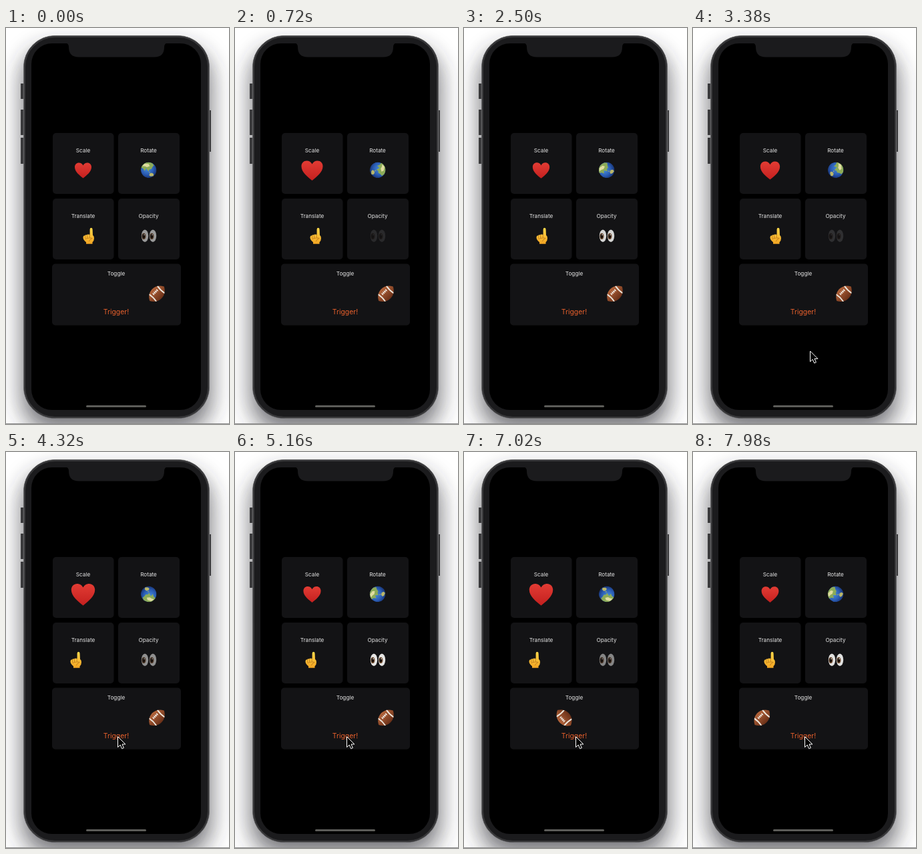
An HTML page for the animation above (8000 ms loop, 334x592 px).

```html
<!DOCTYPE html>
<html lang="en">
<head>
<meta charset="utf-8">
<title>Animation cards</title>
<style>
  html, body { margin: 0; width: 100%; height: 100%; overflow: hidden; background: #fff; }
  svg { display: block; width: 334px; height: 592px; }
  text { font: 8.2px Inter, Roboto, sans-serif; fill: #e6e6e6; text-anchor: middle; }
  #trigger { font-size: 10.4px; fill: #e8602c; }
</style>
</head>
<body>
<svg viewBox="0 0 334 592">
  <defs>
    <linearGradient id="red" x2="0" y2="1">
      <stop stop-color="#e23c34"/><stop offset="1" stop-color="#c4201f"/>
    </linearGradient>
    <radialGradient id="sea" cx=".4" cy=".4" r=".65">
      <stop stop-color="#4a8fdc"/><stop offset=".6" stop-color="#2a5cb4"/><stop offset="1" stop-color="#16306e"/>
    </radialGradient>
    <linearGradient id="skin" x2="0" y2="1">
      <stop stop-color="#ffd84a"/><stop offset="1" stop-color="#f2a422"/>
    </linearGradient>
    <linearGradient id="leather" x2="0" y2="1">
      <stop stop-color="#b4643a"/><stop offset="1" stop-color="#6a3018"/>
    </linearGradient>
    <filter id="blur" x="-30%" y="-20%" width="160%" height="140%"><feGaussianBlur stdDeviation="17"/></filter>
    <clipPath id="disc"><circle r="11.8"/></clipPath>
    <path id="ballShape" d="M-15.5 0C-12-7-6-10 0-10S12-7 15.5 0C12 7 6 10 0 10S-12 7-15.5 0Z"/>
    <clipPath id="ballClip"><use href="#ballShape"/></clipPath>
    <g id="eye">
      <ellipse rx="5.2" ry="9.2" fill="#ececea"/>
      <ellipse cx="-1.6" cy=".6" rx="2.9" ry="4.6" fill="#6e4526"/>
      <ellipse cx="-1.8" cy=".6" rx="1.9" ry="3.2" fill="#1c120a"/>
      <circle cx="-.9" cy="-1.6" r=".9" fill="#fff"/>
    </g>
  </defs>

  <!-- backdrop and phone -->
  <rect width="334" height="592" fill="#fff"/>
  <rect x="24" y="30" width="283" height="572" rx="46" fill="#2c2c30" opacity=".66" filter="url(#blur)"/>
  <rect y="591" width="334" height="1" fill="#8c8c8c"/>
  <path d="M22 83h5v23h-5zM22 122h5v38h-5zM22 164h5v39h-5zM303 123h4v62h-4z" fill="#3a3a3c"/>
  <rect x="26.5" y="11.5" width="278" height="572" rx="47" fill="#1b1b1d" stroke="#6a6a6c"/>
  <rect x="28" y="13" width="275" height="569" rx="45.5" fill="none" stroke="#38383a" stroke-width="2"/>
  <rect x="38" y="23" width="254" height="548" rx="31"/>
  <path d="M89 22.5q5 .5 5 6q0 15 15 15h113q15 0 15-15q0-5.5 5-6z" fill="#1b1b1d"/>
  <rect x="120" y="564" width="90" height="3" rx="1.5" fill="#5c5c58"/>

  <g fill="#131315">
    <rect x="70" y="157" width="91.5" height="91" rx="5"/>
    <rect x="168" y="157" width="92" height="91" rx="5"/>
    <rect x="70" y="255" width="91.5" height="91" rx="5"/>
    <rect x="168" y="255" width="92" height="91" rx="5"/>
    <rect x="69" y="352.5" width="193" height="92" rx="5"/>
  </g>
  <text x="115.5" y="185.5">Scale</text>
  <text x="213.5" y="185.5">Rotate</text>
  <text x="115.5" y="283.5">Translate</text>
  <text x="213.5" y="283.5">Opacity</text>
  <text x="165" y="370.3">Toggle</text>
  <text id="trigger" x="165" y="427.8">Trigger!</text>

  <path id="heart" fill="url(#red)" d="M0 12C-5 8-12.5 2.5-12.5-4.5C-12.5-8.5-9.7-11-6.3-11C-3.6-11-1.2-9.5 0-7C1.2-9.5 3.6-11 6.3-11C9.7-11 12.5-8.5 12.5-4.5C12.5 2.5 5 8 0 12Z"/>

  <g id="globe" clip-path="url(#disc)">
    <circle r="11.8" fill="url(#sea)"/>
    <path fill="#8cab58" d="M-12-3L-9-9Q-3-13 4-11L7-8L5-5L4-2L1-1L0 2L-2 0L-4-2L-6 2L-8-1Z"/>
    <path fill="#e0dca0" d="M-10-5L-7-9L-1-9L1-6L-3-4L-6-5Z"/>
    <path fill="#b9b66a" d="M2 5L5 3.5L8 5L8 8L4 9L1.5 8ZM0 3L3 2.5L2 4Z"/>
  </g>

  <g id="hand">
    <path fill="url(#skin)" d="M1.6-9.6Q1.6-12 3.6-12T5.6-9.6L6-1Q8 0 8 3.5Q8 7.5 5.5 9.5V12H-4V9.5Q-8.5 6-8.5 2.5Q-8.5-.5-6-.5Q-5.2-1.8-3.2-1.5Q-1.6-3 .6-2L1.6-2Z"/>
    <path fill="none" stroke="#b8741a" stroke-width=".8" stroke-linecap="round" d="M1.2-1.6V2M-2.4-1.2V3M-5.4-.2V3.4M-5 4.6Q1 2 5.2 3.6Q1.4 5 .4 8"/>
  </g>

  <g id="eyes">
    <use href="#eye" x="208" y="310.7"/>
    <use href="#eye" x="220" y="310.7"/>
  </g>

  <g id="ball">
    <use href="#ballShape" fill="url(#leather)"/>
    <path d="M-9.5-10Q-7 0-9.5 10M9.5-10Q7 0 9.5 10" fill="none" stroke="#ece6dc" stroke-width="2" clip-path="url(#ballClip)"/>
    <path d="M-5-3.5H5M-4-5.5v4M-1.3-5.5v4M1.3-5.5v4M4-5.5v4" stroke="#f4efe8" stroke-width="1.1"/>
  </g>

  <path id="cursor" d="M0 0V15.8L3.7 12.4L6.2 18L8.9 16.8L6.5 11.4H11.4Z" fill="#000" stroke="#fff"/>
</svg>

<script>
  const LOOP = 8000;   // ms
  const CYCLE = 60;    // steps per back-and-forth
  const el = id => document.getElementById(id);
  const [heart, globe, hand, eyes, ball, trigger, cursor] =
    ['heart', 'globe', 'hand', 'eyes', 'ball', 'trigger', 'cursor'].map(el);

  const clamp = x => Math.min(1, Math.max(0, x));
  const progress = (n, from, to) => clamp((n - from) / (to - from));
  const mix = (a, b, k) => a + (b - a) * k;
  const easeCubic = u => u < .5 ? 4 * u ** 3 : 1 - 4 * (1 - u) ** 3;
  const easeSine = u => (1 - Math.cos(Math.PI * u)) / 2;

  // 0 at step `low`, 1 half a cycle later, then back
  function pingPong(n, low) {
    const p = (((n - low) % CYCLE) + CYCLE) % CYCLE / (CYCLE / 2);
    return p < 1 ? p : 2 - p;
  }

  // Steps advance in an uneven rhythm: 20, 20, 100 ms
  function stepAt(ms) {
    const u = ms + 20, r = u % 140;
    return 3 * Math.floor(u / 140) + (r < 20 ? 0 : r < 40 ? 1 : 2);
  }

  function place(node, x, y, rest = '') {
    node.setAttribute('transform', `translate(${x} ${y}) ${rest}`);
  }

  function draw(ms) {
    const n = stepAt(ms);

    place(heart, 115.5, 212.5, `scale(${mix(1, 1.42, easeCubic(pingPong(n, 0)))})`);
    place(globe, 213.7, 212.4, `rotate(${n * 360 / CYCLE})`);
    place(hand, 115.5 + mix(-15, 15, pingPong(n, 37.5)), 310.8);
    eyes.setAttribute('opacity', mix(.1, 1, easeSine(pingPong(n, 17.5))));

    const toggle = easeCubic(progress(n, 135.7, 165.7));
    place(ball, mix(226, 103.3, toggle), 397.3, `rotate(${-45 - 720 * toggle}) scale(.98)`);

    const press = progress(n, 125, 128) - progress(n, 132, 137);
    trigger.setAttribute('opacity', mix(1, .2, press));

    const enter = easeSine(progress(n, 60, 73)), approach = easeSine(progress(n, 75, 90));
    place(cursor, mix(mix(215, 175.5, enter), 167.5, approach),
                  mix(mix(593, 483, enter), 425.5, approach));
  }

  function tick(now) {
    draw(now % LOOP);
    requestAnimationFrame(tick);
  }
  draw(0);
  requestAnimationFrame(tick);
</script>
</body>
</html>
```
